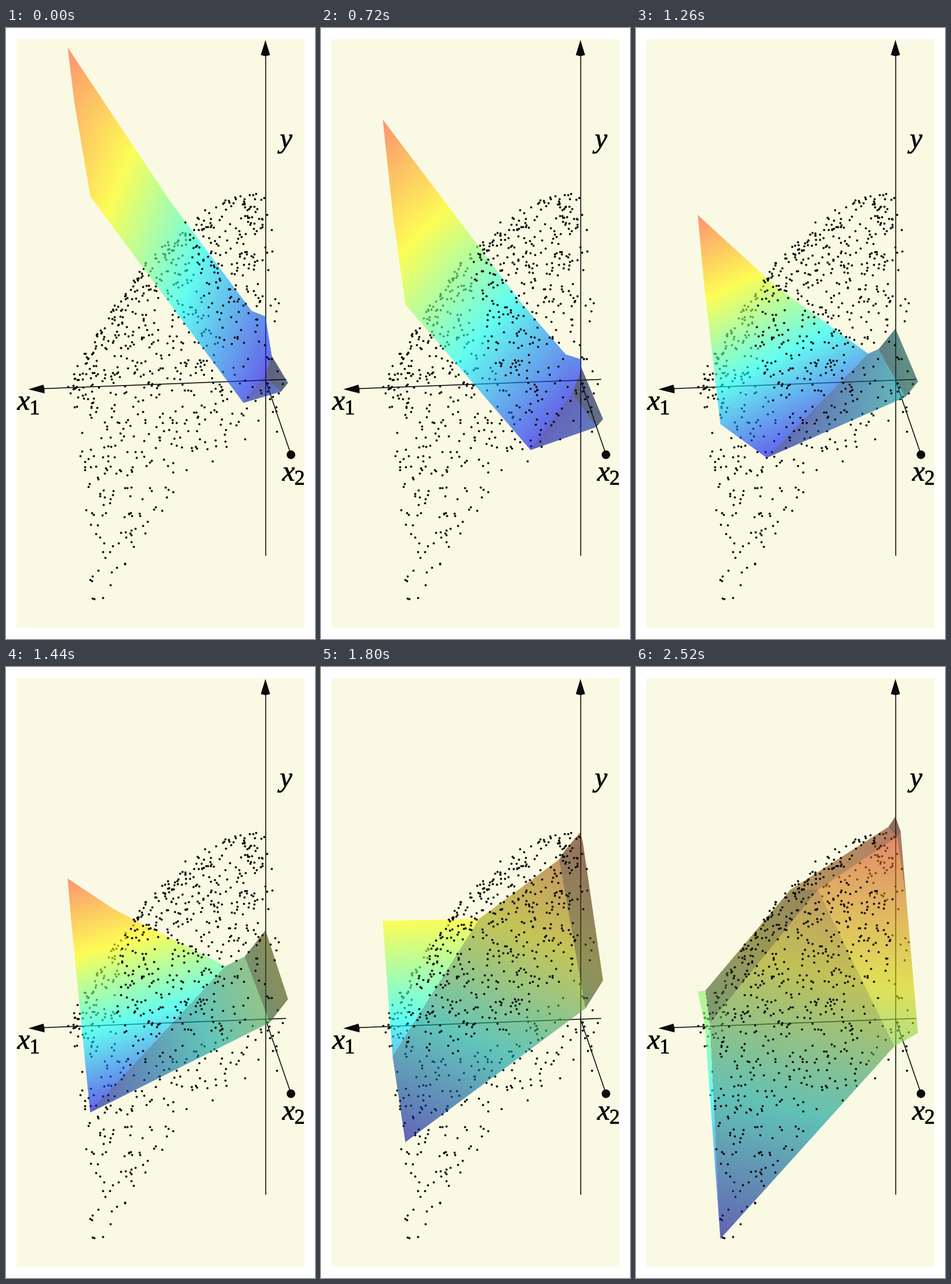
Animation of 533x1051 px, one loop 2.7 s. Source, as a matplotlib script:

```python
import numpy as np
import matplotlib.pyplot as plt
from matplotlib.animation import FuncAnimation
from matplotlib.patches import Circle, Polygon, Rectangle
from matplotlib.patheffects import Normal, Stroke

W, H = 533, 1051
FRAMES, INTERVAL = 15, 180
PX = 0.72  # points per pixel at 100 dpi
INK = "#0b0b0b"
OPACITY = 0.62

# The unit square (u, v) is seen in parallel projection.
ORIGIN_X, U_DX, V_DX = 447, -341, 39
U_DY, V_DY = 15, 113

KEY_TIMES = np.array([0, 2, 5, 7, 9, 12, 14])

# Screen heights of the corners (u, v) = (1,0), (1,1), (0,0), (0,1).
CORNERS = np.array([(1, 0), (1, 1), (0, 0), (0, 1)], float)
CORNER_Y = [
    (33, 289, 497, 610), (64, 337, 515, 625), (213, 553, 576, 674),
    (321, 682, 517, 607), (398, 773, 371, 541), (511, 955, 218, 610),
    (556, 982, 257, 632),
]

# Each crease: its active side, then per key time two border points
# (edge, x, y); None while the crease lies outside the square.
CREASES = [
    ((-1, 0), [
        (("top", 423, 486), ("bottom", 474, 625)),
        (("top", 424, 505), ("bottom", 474, 640)),
        (("top", 420, 580), ("bottom", 473, 690)),
        (("top", 418, 553), ("bottom", 464, 635)),
        (("top", 406, 427), ("bottom", 448, 594)),
        (("top", 428, 247), ("bottom", 485, 611)),
        (("top", 435, 275), ("right", 466, 400)),
    ]),
    ((-1, 1), [
        (("right", 458, 562), ("bottom", 409, 645)),
        (("right", 457, 570), ("bottom", 398, 663)),
        (("top", 438, 585), ("bottom", 329, 744)),
        (("top", 400, 558), ("bottom", 225, 738)),
        (("top", 342, 464), ("left", 133, 722)),
        (("top", 130, 502), ("left", 109, 540)),
        (("top", 119, 560), ("left", 145, 982)),
    ]),
    ((1, -1), [
        (("top", 280, 293), ("left", 117, 125)),
        (("top", 299, 345), ("left", 118, 170)),
        (("top", 340, 497), ("left", 125, 395)),
        (("top", 240, 444), ("left", 117, 440)),
        (("top", 124, 407), ("left", 107, 410)),
        None, None,
    ]),
    ((-1, -1), [
        None, None, None, None, None,
        (("top", 308, 317), ("right", 470, None)),
        (("top", 266, 379), ("bottom", 445, 652)),
    ]),
    ((0, -1), [
        None, None, None, None, None,
        (("left", 109, 540), ("right", 450, 225)),
        (("left", 118, 615), ("right", 456, 282)),
    ]),
]


def border_point(edge, x):
    if edge in ("top", "bottom"):
        v = float(edge == "bottom")
        return np.array([(x - ORIGIN_X - V_DX * v) / U_DX, v])
    u = float(edge == "left")
    return np.array([u, (x - ORIGIN_X - U_DX * u) / V_DX])


def line_through(ends, side):
    """Unit normal towards the active side, and offset."""
    p, q = (border_point(edge, x) for edge, x, _ in ends)
    normal = np.array([p[1] - q[1], q[0] - p[0]])
    normal *= np.sign(normal @ side) / np.hypot(*normal)
    return [*normal, normal @ p]


def solve_key(k):
    """Plane coefficients, then (nu, nv, offset, bend) for each crease."""
    points, heights = list(CORNERS), list(CORNER_Y[k])
    lines = np.full((len(CREASES), 4), np.nan)
    for i, (side, keys) in enumerate(CREASES):
        if keys[k]:
            lines[i, :3] = line_through(keys[k], side)
            for edge, x, y in keys[k]:
                if y is not None:
                    points.append(border_point(edge, x))
                    heights.append(y)
    points = np.array(points)
    active = ~np.isnan(lines[:, 0])
    bends = np.maximum(points @ lines[active, :2].T - lines[active, 2], 0)
    basis = np.column_stack([np.ones(len(points)), points, bends])
    fit = np.linalg.lstsq(basis, np.array(heights, float), rcond=None)[0]
    lines[active, 3] = fit[3:]
    return fit[:3], lines


def build_keys():
    planes, lines = map(np.array, zip(*map(solve_key, range(len(KEY_TIMES)))))
    for i in range(len(CREASES)):
        known = np.flatnonzero(~np.isnan(lines[:, i, 0]))
        for k in range(len(KEY_TIMES)):
            if k not in known:
                nearest = known[np.argmin(abs(known - k))]
                lines[k, i] = lines[nearest, i]
                # Park just outside the square.
                lines[k, i, 2] = (CORNERS @ lines[k, i, :2]).max() + 0.03
    return np.hstack([planes, lines.reshape(len(KEY_TIMES), -1)])


KEYS = build_keys()
SLOPES = np.gradient(KEYS, KEY_TIMES, axis=0)


def state_at(frame):
    i = min(np.searchsorted(KEY_TIMES, frame, side="right") - 1, len(KEY_TIMES) - 2)
    span = KEY_TIMES[i + 1] - KEY_TIMES[i]
    s = (frame - KEY_TIMES[i]) / span
    state = ((1 + 2 * s) * (1 - s) ** 2 * KEYS[i]
             + s * s * (3 - 2 * s) * KEYS[i + 1]
             + span * s * (1 - s) ** 2 * SLOPES[i]
             - span * s * s * (1 - s) * SLOPES[i + 1])
    return state[:3], state[3:].reshape(-1, 4)


def surface_y(plane, lines, uv):
    bends = np.maximum(uv @ lines[:, :2].T - lines[:, 2], 0)
    return plane[0] + uv @ plane[1:] + bends @ lines[:, 3]


def rainbow(t):
    stops = [0, 0.33, 0.66, 1]
    channels = [(0.04, 0.03, 1, 1), (0.04, 1, 1, 0.32), (0.93, 0.98, 0, 0.17)]
    return np.stack([np.interp(t, stops, c) for c in channels], axis=-1)


def brightness(gu, gv):
    normal = np.array([gu - U_DY, gv - V_DY, 350])
    light = np.array([-0.55, 0.5, 0.67])
    return np.clip(0.29 + 0.9 * (normal @ light) / np.linalg.norm(normal), 0.28, 1)


X0, X1, Y0, Y1 = 98, 494, 20, 1010
COLS = np.arange(X0, X1)[None, :]
ROWS = np.arange(Y0, Y1)[:, None]
SAMPLES = np.stack(np.meshgrid(*[np.linspace(0, 1, 81)] * 2), axis=-1).reshape(-1, 2)
BORDERS = [(1, 0, 0), (-1, 0, 1), (0, 1, 0), (0, -1, 1)]


def render_surface(plane, lines):
    sides = SAMPLES @ lines[:, :2].T > lines[:, 2]
    lift = SAMPLES @ [U_DY, V_DY] - surface_y(plane, lines, SAMPLES)
    low, high = lift.min(), lift.max()
    facets, label = np.unique(sides, axis=0, return_inverse=True)
    label = label.ravel()
    depth = [SAMPLES[label == i, 1].mean() for i in range(len(facets))]

    color = np.zeros((Y1 - Y0, X1 - X0, 3))
    alpha = np.zeros((Y1 - Y0, X1 - X0))
    for i in np.argsort(depth):
        on = facets[i]
        bend = lines[:, 3] * on
        gu, gv = plane[1:] + bend @ lines[:, :2]
        base = plane[0] - bend @ lines[:, 2]
        matrix = np.array([[U_DX, V_DX], [gu, gv]])
        if abs(np.linalg.det(matrix)) < 1:
            continue
        inverse = np.linalg.inv(matrix)
        dx, dy = COLS - ORIGIN_X, ROWS - base
        u = inverse[0, 0] * dx + inverse[0, 1] * dy
        v = inverse[1, 0] * dx + inverse[1, 1] * dy

        cover = np.ones_like(u)
        for a, b, c in BORDERS:
            per_pixel = np.hypot(*(np.array([a, b]) @ inverse))
            cover = np.minimum(cover, (a * u + b * v + c) / per_pixel + 0.5)
        for (nu, nv, offset, _), positive in zip(lines, on):
            cover[(nu * u + nv * v > offset) != positive] = 0
        mask = cover > 0
        solid = OPACITY * np.clip(cover[mask], 0, 1)

        height = (U_DY * u + V_DY * v - ROWS)[mask]
        tint = rainbow((height - low) / (high - low)) * brightness(gu, gv)
        color[mask] = tint * solid[:, None] + color[mask] * (1 - solid)[:, None]
        alpha[mask] = solid + alpha[mask] * (1 - solid)
    rgb = color / np.maximum(alpha, 1e-6)[..., None]
    return np.clip(np.dstack([rgb, alpha]), 0, 1)


def make_cloud(count=840):
    rng = np.random.default_rng(11)
    uv = rng.random((count, 2)) ** [0.85, 1]
    u, v = uv.T
    x = ORIGIN_X + U_DX * u + V_DX * v
    y = 283 + 330 * u ** 2 + (150 - 130 * u) * v + (257 + 145 * u) * v ** 2
    return uv, np.column_stack([x, y]) + rng.normal(0, 2.5, (count, 2))


fig = plt.figure(figsize=(W / 100, H / 100), dpi=100, facecolor="white")
ax = fig.add_axes([0, 0, 1, 1])
ax.axis("off")

ax.add_patch(Rectangle((17.5, 18.5), 497, 1013, color="#fafae4", lw=0, zorder=0))
for xs, ys in [((447, 447), (40, 906)), ((482, 60), (604, 620)), ((447, 491), (605, 733))]:
    ax.plot(xs, ys, color=INK, lw=1.6 * PX, zorder=1)
for head in ([(447, 20), (439, 46), (447, 48), (455, 46)],
             [(38, 621), (64, 613), (66, 620), (66, 628)]):
    ax.add_patch(Polygon(head, color=INK, lw=0, zorder=1))
ax.add_patch(Circle((491, 733.5), 7.4, color=INK, lw=0, zorder=1))


def label(x, y, text, size, style="italic"):
    ax.text(x, y, text, fontsize=size * PX, style=style, color=INK, zorder=5,
            family="Liberation Serif", va="baseline", ha="left",
            path_effects=[Stroke(linewidth=0.8 * PX, foreground=INK), Normal()])


label(472, 205, "y", 48)
label(19, 656, "x", 49)
label(40, 664, "1", 36, "normal")
label(476, 778, "x", 49)
label(497, 785, "2", 36, "normal")

cloud_uv, cloud_xy = make_cloud()
dots = dict(s=(3.8 * PX) ** 2, color=INK, linewidths=0)
behind = ax.scatter([], [], zorder=2, **dots)
sheet = ax.imshow(np.zeros((Y1 - Y0, X1 - X0, 4)), aspect="auto",
                  extent=(X0 - 0.5, X1 - 0.5, Y1 - 0.5, Y0 - 0.5),
                  interpolation="nearest", zorder=3)
ahead = ax.scatter([], [], zorder=4, **dots)
# Whole coordinates fall on pixel centres.
ax.set_xlim(-0.5, W - 0.5)
ax.set_ylim(H - 0.5, -0.5)


def draw(frame):
    plane, lines = state_at(frame)
    sheet.set_data(render_surface(plane, lines))
    above = cloud_xy[:, 1] < surface_y(plane, lines, cloud_uv)
    ahead.set_offsets(cloud_xy[above])
    behind.set_offsets(cloud_xy[~above])
    return behind, sheet, ahead


animation = FuncAnimation(fig, draw, frames=FRAMES, interval=INTERVAL,
                          repeat=True, repeat_delay=0)
plt.show()
```
